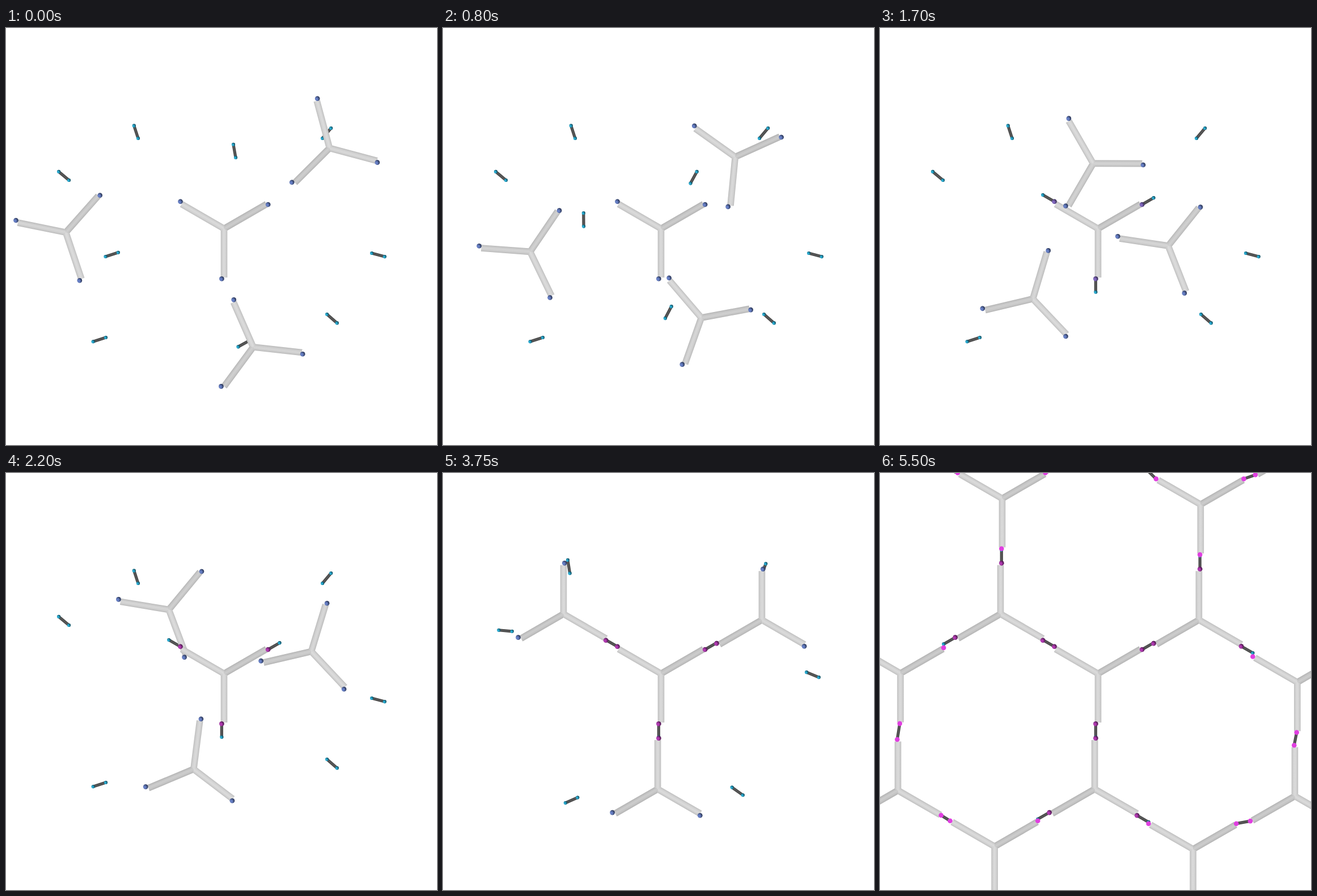
An HTML page for the animation above (6.5 s loop, 760 px wide and 737 px high).

```html
<!DOCTYPE html>
<html lang="en">
<head>
<meta charset="utf-8">
<title>Lattice assembly</title>
<style>
html, body { margin: 0; width: 100%; height: 100%; overflow: hidden; background: #fff; }
svg { display: block; width: 100vw; height: 100vh; }
</style>
</head>
<body>
<svg viewBox="0 0 760 737">
  <defs>
    <linearGradient id="tube" gradientUnits="userSpaceOnUse" x1="0" y1="-5.8" x2="0" y2="5.8">
      <stop offset="0" stop-color="#bfbfbf"/>
      <stop offset=".25" stop-color="#d3d3d3"/>
      <stop offset=".55" stop-color="#dcdcdc"/>
      <stop offset=".8" stop-color="#d0d0d0"/>
      <stop offset="1" stop-color="#bebebe"/>
    </linearGradient>
    <linearGradient id="bar" gradientUnits="userSpaceOnUse" x1="0" y1="-2.6" x2="0" y2="2.6">
      <stop offset="0" stop-color="#424242"/>
      <stop offset=".5" stop-color="#5c5c5c"/>
      <stop offset="1" stop-color="#404040"/>
    </linearGradient>
    <radialGradient id="shade" cx=".3" cy=".62" r=".75">
      <stop offset="0" stop-color="#000" stop-opacity="0"/>
      <stop offset=".4" stop-color="#000" stop-opacity=".12"/>
      <stop offset="1" stop-color="#000" stop-opacity=".7"/>
    </radialGradient>
  </defs>
  <g id="rods"></g>
  <g id="outer"></g>
  <g id="arms"></g>
  <g id="dots"></g>
  <g id="outerDots"></g>
</svg>
<script>
const LOOP = 6500, LAST = 5500, STEP = 50, STAGE = 1500;
const REACH = 89.3;  // centre of a tripod to its dots
const BOND = 23.5;   // length of a rod
const SKEW = 1.9;    // dots sit slightly clockwise of their arms
const BLUE = [108, 134, 208], PINK = [188, 62, 188];
const SIDES = [0, 1, 2];
const $ = id => document.getElementById(id);

function add(parent, tag, attrs = {}) {
  const el = document.createElementNS("http://www.w3.org/2000/svg", tag);
  for (const k in attrs) el.setAttribute(k, attrs[k]);
  parent.appendChild(el);
  return el;
}

const lerp = (a, b, p) => a + (b - a) * p;
function ease(t, from, to) {
  const u = Math.min(1, Math.max(0, (t - from) / (to - from)));
  return u * u * (3 - 2 * u);
}
const mix = (p, q, u) => ({ x: lerp(p.x, q.x, u), y: lerp(p.y, q.y, u) });
const dist = (p, q) => Math.hypot(p.x - q.x, p.y - q.y);
function step({ x, y }, length, angle) {
  const a = angle * Math.PI / 180;
  return { x: x + length * Math.cos(a), y: y + length * Math.sin(a) };
}
const place = (el, { x, y }, a = 0) =>
  el.setAttribute("transform", `translate(${x.toFixed(2)} ${y.toFixed(2)}) rotate(${a.toFixed(2)})`);

function makeDot(parent, r, fill) {
  const g = add(parent, "g");
  const ball = add(g, "circle", { r, fill });
  add(g, "circle", { r, fill: "url(#shade)" });
  return { g, ball };
}

function makeArms(parent) {
  const g = add(parent, "g");
  parent.prepend(g);
  add(g, "circle", { r: 4.5, fill: "#cdcdcd" });
  const d = "M0 0L3.3 5.8H86.5V-5.8H3.3Z";
  const dims = SIDES.map(k => {
    const arm = add(g, "g", { transform: `rotate(${k * 120})` });
    add(arm, "path", { d, fill: "url(#tube)" });
    return add(arm, "path", { d });
  });
  return { g, dims };
}

// Arms that lie along the light look darker.
function poseArms({ g, dims }, p, a) {
  place(g, { x: p.x + 1.2, y: p.y + 0.6 }, a);
  dims.forEach((dim, k) =>
    dim.setAttribute("opacity", 0.07 * Math.cos((a + k * 120 + 30) * Math.PI / 180) ** 4));
}

function makeRod(parent, length = BOND) {
  const g = add(parent, "g");
  add(g, "rect", { y: -2.6, width: length, height: 5.2, fill: "url(#bar)" });
  return g;
}

// The camera stretches the flat lattice a little and bends its sides down.
const core = { x: 383.3, y: 354, a: 90, skew: SKEW };
function view({ x, y }) {
  const dx = x - core.x;
  return { x, y: core.y + (y - core.y) * 1.01 + 6e-5 * dx * dx };
}
const dotOf = (node, p, k, a = node.a) => step(p, REACH, a + node.skew + k * 120);

// Tripod joined by a rod to side k of the given one; its own side 0 is the joint.
function neighbour(node, k, skew) {
  const bond = node.a + k * 120;
  const joint = step(dotOf(node, node, k), BOND, bond);
  return { ...step(joint, REACH, bond + skew), a: bond + 180, skew };
}

// Start of each free tripod: place, extra turn, side of its pivot
const starts = [
  { x: 104.3, y: 360.7, turn: 41.5, lean: -15.6 },
  { x: 569.3, y: 211.7, turn: 225, lean: -15.6 },
  { x: 434.7, y: 563.3, turn: 96.4, lean: 15.6 }
];
const ring = SIDES.map(k => ({ ...neighbour(core, k, SKEW), start: starts[k] }));
core.start = { x: core.x, y: core.y, turn: 0, lean: 0 };
const tripods = [...ring, core].reverse();
for (const node of tripods) {
  node.end = view(node);
  node.arms = makeArms($("arms"));
  node.dots = SIDES.map(() => makeDot($("dots"), 4.3, "#6c86d0"));
}

// Start of each rod: place of the end that will attach, extra turn
function makeRods(host, sides, from, begins) {
  return begins.map(([x, y, turn], i) => {
    const g = makeRod($("rods")), k = sides[i];
    return {
      g, from, turn, start: { x, y },
      end: dotOf(host, host.end, k), a: host.a + k * 120,
      tips: [0, BOND].map(x => ({ x, dot: makeDot(g, 3.1, "#2cb6de").g }))
    };
  });
}
const rods = [
  ...makeRods(core, SIDES, 0, [[430, 552, 61], [175.5, 404, 132], [405, 229, -70]]),
  ...makeRods(ring[0], [1, 2], 2 * STAGE, [[566, 506, 11], [176, 547, 12]]),
  ...makeRods(ring[1], [1, 2], 2 * STAGE, [[111, 269, 70], [233, 195, -18]]),
  ...makeRods(ring[2], [1, 2], 2 * STAGE, [[558, 195, 40], [645, 398, -15]])
];

// Two more generations of the lattice; places reached twice are averaged.
function grow(parents) {
  const nodes = [];
  for (const parent of parents)
    for (const k of [1, 2]) {
      const node = neighbour(parent, k, 0);
      const twin = nodes.find(n => dist(n, node) < 60);
      if (twin) Object.assign(twin, mix(twin, node, 0.5));
      else nodes.push(node);
    }
  return nodes;
}
const second = grow(ring);
const tips = [];
for (const node of [...second, ...grow(second)]) {
  const p = view(node);
  poseArms(makeArms($("outer")), p, node.a);
  for (const k of SIDES) {
    const tip = dotOf(node, p, k);
    const mate = tips.find(q => dist(q, tip) < 45);
    if (mate) {
      const angle = Math.atan2(tip.y - mate.y, tip.x - mate.x) * 180 / Math.PI;
      place(makeRod($("outer"), dist(mate, tip)), mate, angle);
    }
    tips.push(tip);
    add($("outerDots"), "circle", { cx: tip.x, cy: tip.y, r: 4.3, fill: "#e03fe0" });
  }
}

function draw(t) {
  for (const rod of rods) {
    const p = ease(t, rod.from, rod.from + STAGE);
    const a = rod.a + rod.turn * (1 - p);
    place(rod.g, mix(rod.start, rod.end, p), a);
    for (const { x, dot } of rod.tips) place(dot, { x, y: 0 }, -a);
  }

  const p = ease(t, 0, 2 * STAGE);
  for (const node of tripods) {
    const { start, end, arms, dots } = node;
    const turn = start.turn * (1 - p), a = node.a + turn;
    // The pivot moves straight while the tripod swings about it.
    const pivot = mix(step(start, -start.lean, 90 + start.turn), step(end, -start.lean, 90), p);
    const centre = step(pivot, start.lean, 90 + turn);
    poseArms(arms, centre, a);
    dots.forEach(({ g, ball }, k) => {
      place(g, dotOf(node, centre, k, a));
      const join = STAGE * (node === core ? 1 : k === 0 ? 2 : 3);
      const q = ease(t, join, join + 500);
      ball.setAttribute("fill", `rgb(${BLUE.map((c, i) => Math.round(lerp(c, PINK[i], q)))})`);
    });
  }

  const fade = ease(t, 3 * STAGE, LAST);
  $("outer").setAttribute("opacity", fade);
  $("outerDots").setAttribute("opacity", fade);
}

let begin;
function tick(now) {
  begin ??= now;
  const t = (now - begin) % LOOP;
  draw(Math.min(LAST, Math.floor(t / STEP) * STEP));
  requestAnimationFrame(tick);
}
draw(0);
requestAnimationFrame(tick);
</script>
</body>
</html>
```
